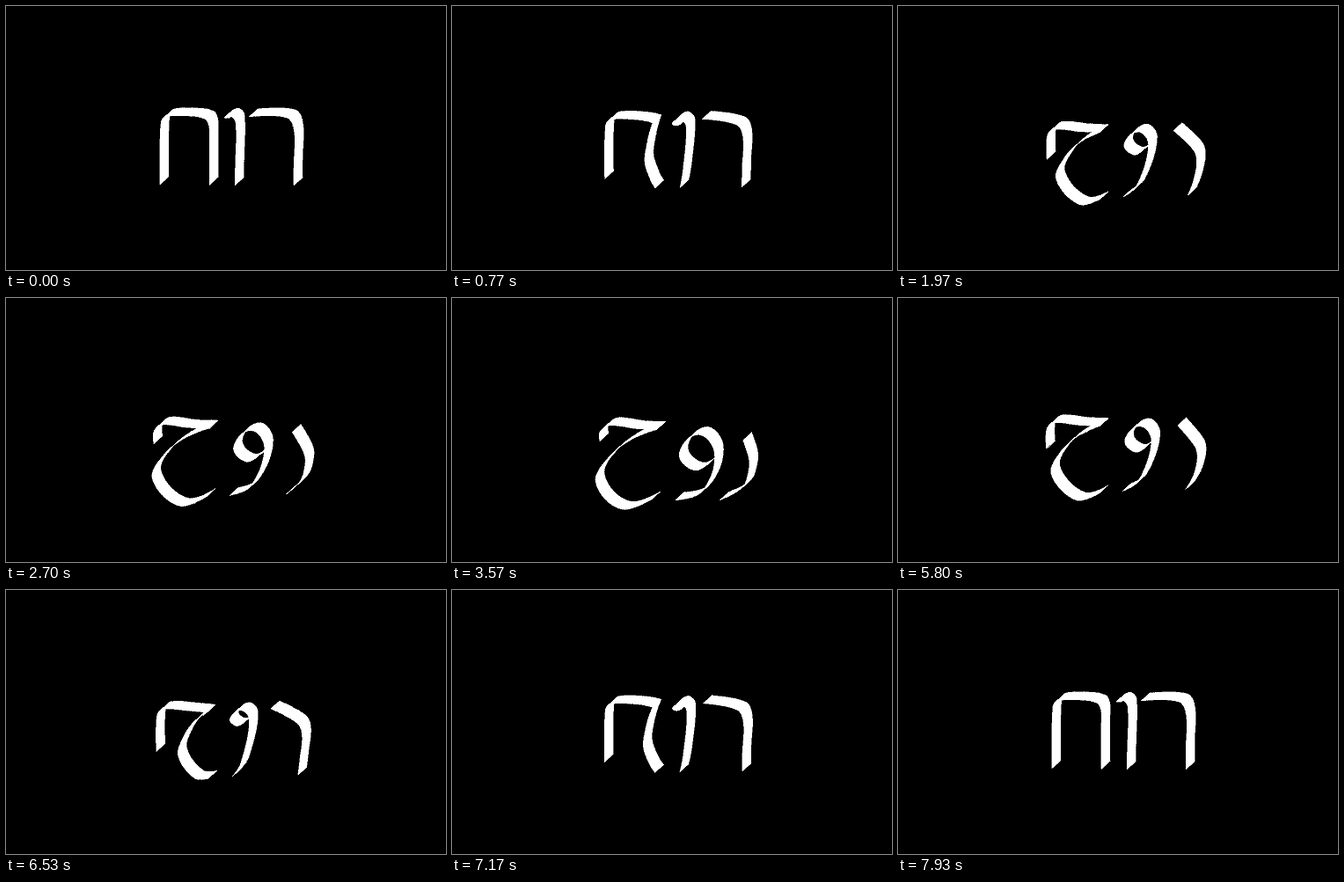
An HTML page for the animation above (8 s loop, 500 by 300 pixels).

```html
<!DOCTYPE html>
<html>
<head>
<meta charset="utf-8">
<style>
html, body { margin: 0; width: 100%; height: 100%; overflow: hidden; background: #000; }
svg { display: block; width: 500px; height: 300px; }
</style>
</head>
<body>
<svg viewBox="0 0 500 300"><path id="word" fill="#fff" stroke="#fff" stroke-width=".4" shape-rendering="crispEdges"/></svg>
<script>
const LOOP = 8000;
const STEPS = 16;
const NIB = [5, -4.5]; // half of the slanted pen edge

// Pen paths, one per letter: Hebrew, halfway, Arabic. Each point is "x,y".
const letters = [
  { corner: 4, // het
    hebrew: '180,198.5 181,128 187,121.2 222,121.2 233,125 236,134 236,150 236,168 236,185 236,199',
    halfway: '174,169.5 174.5,143 182,136 212,138.5 234,139.5 211,151 193,169 184,193 210,221.5 234,215.5',
    arabic: '173,158 173,148 184,140.5 215,144 238,145 210,156 182,178 168.5,206 196,235.5 232,224.5' },
  { // vav
    hebrew: '259,122.5 255,122.5 253,122.5 260,121 266,128 265.5,180 265,199.5',
    halfway: '285,159 273,165.5 262,153.5 278,139 290,154 276,201 260.5,213',
    arabic: '301,181 281,192.5 263,174 285,151.5 304,175 289,217 258.5,226' },
  { // resh
    hebrew: '281,121.5 324,122.5 332.5,138 332,178 332,199.5',
    halfway: '318.5,137.5 341,160 344.5,173 340.5,195 334,211',
    arabic: '336,158.5 341.8,178 341.5,192 334,212 307,226' }
];

const parse = text => text.split(' ').map(pair => pair.split(',').map(Number));
for (const letter of letters)
  for (const pose of ['hebrew', 'halfway', 'arabic']) letter[pose] = parse(letter[pose]);

// Each point follows a parabola through its three poses.
const bend = (p, a, b, c) =>
  (1 - p) * (1 - 2 * p) * a + 4 * p * (1 - p) * b + p * (2 * p - 1) * c;

const pathAt = (letter, p) => letter.hebrew.map((point, i) =>
  point.map((v, k) => bend(p, v, letter.halfway[i][k], letter.arabic[i][k])));

// Samples a smooth curve through the points, sharp at one corner.
function sample(pts, corner) {
  const handle = (i, reach) => {
    const [x, y] = pts[i], a = pts[i - 1], b = pts[i + 1];
    if (!a || !b || i === corner) return pts[i];
    const dx = b[0] - a[0], dy = b[1] - a[1];
    const k = reach / (Math.hypot(dx, dy) || 1);
    return [x + dx * k, y + dy * k];
  };
  const out = [pts[0]];
  for (let i = 0; i + 1 < pts.length; i++) {
    const a = pts[i], d = pts[i + 1];
    const reach = Math.hypot(d[0] - a[0], d[1] - a[1]) / 3;
    const b = handle(i, reach), c = handle(i + 1, -reach);
    for (let s = 1; s <= STEPS; s++) {
      const t = s / STEPS, u = 1 - t;
      out.push(a.map((v, k) =>
        u * u * u * v + 3 * u * u * t * b[k] + 3 * u * t * t * c[k] + t * t * t * d[k]));
    }
  }
  return out;
}

// Area covered by the nib between two samples, always wound the same way.
function sweep(p, q) {
  const [nx, ny] = NIB;
  if (nx * (q[1] - p[1]) < ny * (q[0] - p[0])) [p, q] = [q, p];
  const edge = ([x, y], side) => [(x + side * nx).toFixed(2), (y + side * ny).toFixed(2)];
  return 'M' + [edge(p, -1), edge(p, 1), edge(q, 1), edge(q, -1)].join('L') + 'Z';
}

const word = document.getElementById('word');
const start = performance.now();

function draw() {
  const t = (performance.now() - start) % LOOP;
  const p = (1 - Math.cos(2 * Math.PI * t / LOOP)) / 2;
  let d = '';
  for (const letter of letters) {
    const line = sample(pathAt(letter, p), letter.corner);
    for (let i = 1; i < line.length; i++) d += sweep(line[i - 1], line[i]);
  }
  word.setAttribute('d', d);
  requestAnimationFrame(draw);
}
draw();
</script>
</body>
</html>
```
